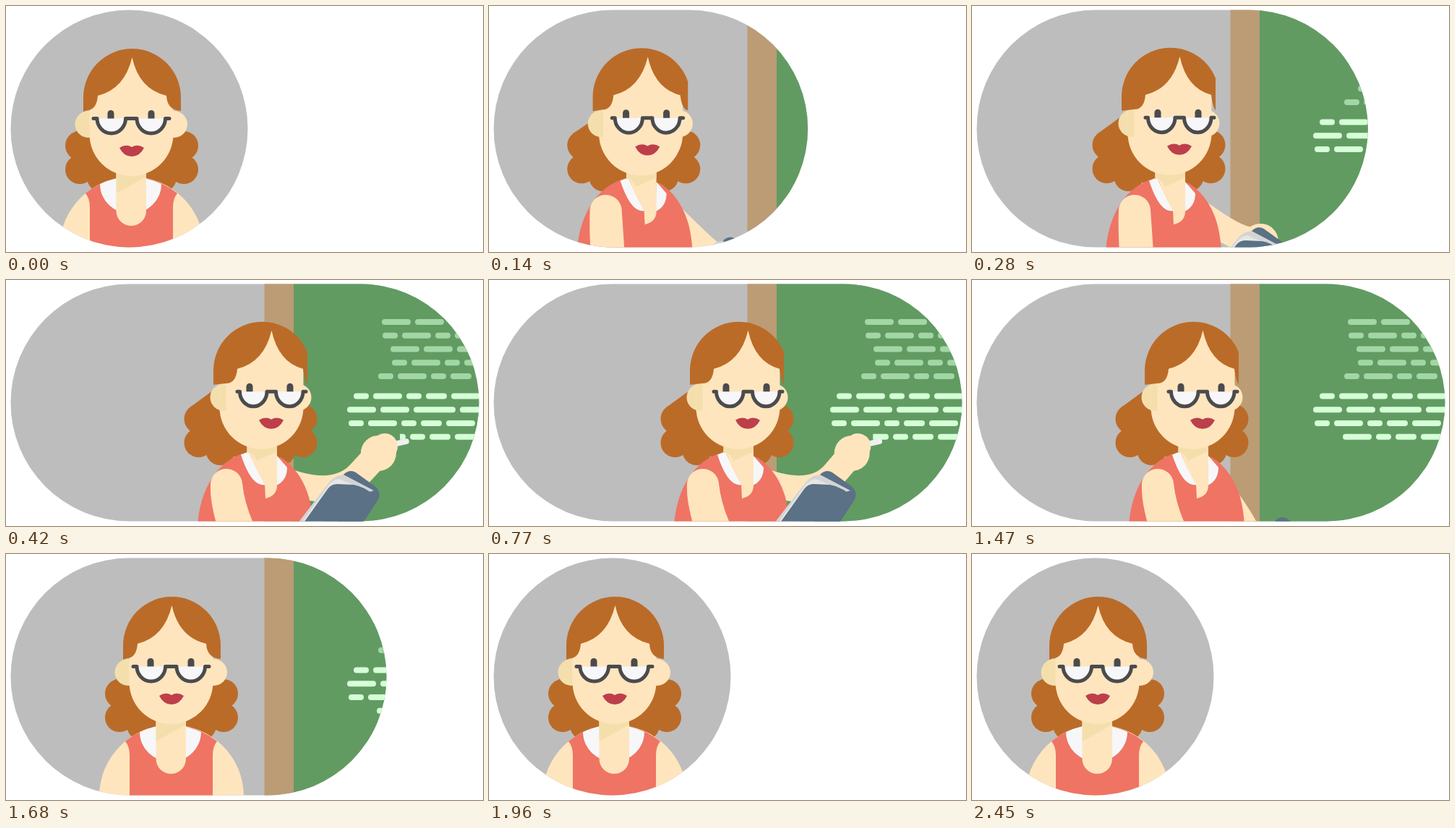
An HTML page for the animation above (2730 ms loop, 660 by 340 pixels).

```html
<!DOCTYPE html>
<html>
<head>
<meta charset="utf-8">
<title>Teacher at the board</title>
<style>
html, body { margin: 0; width: 100%; height: 100%; overflow: hidden; background: #fff; }
svg { display: block; }
</style>
</head>
<body>
<svg width="660" height="340" viewBox="0 0 660 340">
  <clipPath id="pill"><rect id="window" x="6.5" y="5.5" width="328" height="328" rx="164"/></clipPath>
  <clipPath id="written"><rect id="reveal" y="205" width="200" height="24"/></clipPath>
  <g clip-path="url(#pill)">
    <rect width="660" height="340" fill="#bdbdbd"/>
    <rect x="357.5" width="41" height="340" fill="#bc9c74"/>
    <rect x="398" width="262" height="340" fill="#619b62"/>
    <g id="rows" stroke-width="8" stroke-linecap="round"></g>
    <g id="her"></g>
  </g>
</svg>
<script>
const LOOP = 2730, STEP = 70;
const SKIN = '#fee5bd', SHADE = '#f4dfac', HAIR = '#bb6b28', DRESS = '#ef7464',
      WHITE = '#f7f7f9', DARK = '#4b4b4d', LIPS = '#bd3f4a', BOOK = '#5a7186';
const $ = id => document.getElementById(id);
const lerp = (a, b, k) => a + (b - a) * k;

// Piecewise linear track: time, value, time, value...
function track(t, ...k) {
  if (t <= k[0]) return k[1];
  for (let i = 2; i < k.length; i += 2)
    if (t <= k[i]) return lerp(k[i - 1], k[i + 1], (t - k[i - 2]) / (k[i] - k[i - 2]));
  return k[k.length - 1];
}

const path = (d, fill, more = '') => `<path d="${d}" fill="${fill}" ${more}/>`;
const disc = (x, y, r, fill) => `<circle cx="${x}" cy="${y}" r="${r}" fill="${fill}"/>`;
const pen = (color, w) =>
  `stroke="${color}" stroke-width="${w}" stroke-linecap="round" stroke-linejoin="round"`;
const stroke = (d, color, w) => path(d, 'none', pen(color, w));

// Chalk rows: left end and the kinds of dash that follow
function chalkRows() {
  const size = { s: 21, m: 29, l: 40, w: 58 };
  const rows = '520ll 521slsl 532llsl 534slsl 515slsm 481slsml 472llwl 474slsml 513lsml'.split(' ');
  return rows.map((row, i) => {
    const lower = i > 4, y = 57.9 + 18.8 * i + (lower ? 8.5 : 0);
    let x = parseInt(row), d = '';
    for (const kind of row.slice(3)) {
      d += `M${x + 4} ${y}h${size[kind] - 8}`;
      x += size[kind] + 6;
    }
    const clip = i === rows.length - 1 ? 'clip-path="url(#written)"' : '';
    return path(d, 'none', `stroke="${lower ? '#d5ffd6' : '#a3d6a5'}" ${clip}`);
  }).join('');
}

function backHair(u) {
  const lobes = [[72, 193], [72, 226], [42, 237]];
  return `<g transform="translate(${-15.5 * u} ${-u})">` +
    path(`M${112 + 9.5 * u} ${165 - 11 * u}L90 177V226L132 245H216L246 226V193L190 150Z`, HAIR) +
    lobes.map(([dx, y]) => disc(174 - dx, y, 20, HAIR) + disc(174 + dx, y, 20, HAIR)).join('') +
    '</g>';
}

function frontBody() {
  return `<ellipse cx="174" cy="335" rx="100" ry="99" fill="${SKIN}"/>` +
    path('M116 340V278Q116 266 110 259A100 99 0 0 1 237 259Q231 266 231 278V340Z', DRESS) +
    path('M130 246A42.5 41 0 0 0 215 246A100 99 0 0 0 130 246Z', WHITE) +
    path('M152.5 220V283A20.7 20.7 0 0 0 194 283V220Z', SKIN) +
    path('M152.5 225H194V236L152.5 259Z', SHADE);
}

// lift: 0 hanging, 1 reaching forward, 2 writing
function rightArm(lift, nudge) {
  const ex = 245 + 15 * lift, ey = 335 - 15 * lift;
  const hx = 262 + 39 * lift + nudge, hy = 370 - 18 * lift - 26 * lift * lift;
  const mx = (ex + hx) / 2, my = (ey + hy) / 2;
  const chalk = lift > 1.4 ? stroke(`M${hx + 8} ${hy - 2}l22 -5`, '#f0f0f0', 7.5) : '';
  return chalk + stroke(`M200 275Q${ex} ${ey} ${mx} ${my}L${hx} ${hy}`, SKIN, 36) +
    disc(lerp(hx, mx, 0.25), lerp(hy, my, 0.25), 24.5, SKIN);
}

function book(lift) {
  return `<g transform="translate(-171 ${64 - 12 * lift - 10 * lift * lift})">` +
    path('M440 290L459 268Q467 261 475 266L500 284Q511 292 506 303L478 346L420 420H380Z', BOOK) +
    path('M394 337L434 285Q441 275 449 271L458 269L500 291L470 300L400 420H340Z', '#d4d4d4') +
    path('M399 337L437 284Q443 276 452 275L490 291L450 292L390 420H350Z', '#e6e6e6') +
    path('M401 338L436 289Q441 282 449 282L472 283Q490 286 506 303L478 346L420 420H350Z', BOOK) +
    '</g>';
}

function turnedBody(t) {
  const lift = track(t, 0, 0, 280, 1, 420, 2, 1260, 2, 1470, 0);
  const bend = track(t, 280, 0, 420, 1);
  return rightArm(lift, track(t, 560, 4, 1050, -7)) +
    path('M85 340C88 290 112 250 150 239L200 245Q228 263 239 300Q244 318 245 340Z', DRESS) +
    path('M145 241.5L156 237Q168 265 179 283Q160 287 145 241.5Z', WHITE) +
    path('M195 243L209 259Q209 277 194 284Z', WHITE) +
    path('M153.5 222V238Q157 237 160 246Q168 267 178 282L179 302Q195 298 195 284V222Z', SKIN) +
    path('M153.5 225H195V237L167 250Q160 236 153.5 240Z', SHADE) +
    path(`M${104 + 8 * bend} 340Q102 305 103 285A22 22 0 0 1 147 281` +
      `Q${149 + bend} 310 ${151 + 13 * bend} 340Z`, SKIN) +
    book(lift);
}

function hairCap(u) {
  const r = 67.5, right = 242 - 5 * u;
  const rightY = 126.5 - Math.sqrt(Math.max(0, r * r - (right - 174.5) ** 2));
  const s = 13 * u;
  return path(`M107 146V126.5A${r} ${r} 0 0 1 ${right} ${rightY}V145` +
    `Q${223 + 11 * u} 144 ${222 + 9 * u} 124Q${184 + s} 115 ${174.5 + s} 71` +
    `Q${164 + s} 115 ${127 + s} 124C${126 + s} 138 ${120 + s} 144 ${113 + s} 144Z`, HAIR);
}

function glasses(u) {
  const lens = 39.5 - 2 * u, a = 126 + 17.5 * u, c = 181 + 12.5 * u;
  const rim = `a${lens / 2} 20.5 0 0 0 ${lens} 0`;
  return path(`M${121 + 19 * u} 155.5H${a}${rim}H${c}${rim}H${226 + 9 * u}`, WHITE, pen(DARK, 5));
}

function head(u, blink) {
  const eye = x => blink
    ? path(`M${x - 4.5} 153h9v3h-9Z`, DARK)
    : stroke(`M${x} 148.5V156`, DARK, 9);
  return `<g transform="translate(0 ${-1.3 * u})">` +
    disc(114 + 7 * u, 163.5, 18.5, SHADE) + disc(232.5 - 8.5 * u, 163.5, 18.5, SKIN) +
    `<rect x="115.5" y="66" width="116" height="169" rx="58" fill="${SKIN}"/>` +
    `<rect x="115.5" y="145" width="${9 * u}" height="37" fill="${SHADE}"/>` +
    hairCap(u) + eye(145 + 12 * u) + eye(201 + 12 * u) + glasses(u) +
    path('M157 196Q166 190 174 195Q182 190 191 196Q185 208 174 208Q163 208 157 196Z', LIPS,
      `transform="translate(${13 * u} ${-u})"`) + '</g>';
}

function draw(t) {
  const turn = track(t, 0, 0, 210, 1, 1540, 1, 1680, 0);
  const walk = t < 420
    ? 180 * (t / 420) ** 1.45
    : track(t, 560, 180, 1050, 159, 1260, 159, 1470, 132, 1680, 55, 1960, 0);
  const blink = t === 2170 || t === 2380;
  $('window').setAttribute('width', track(t, 0, 328, 420, 648, 1540, 648, 1890, 328));
  $('reveal').setAttribute('x', track(t, 560, 545, 1050, 513));
  $('her').setAttribute('transform', `translate(${walk})`);
  $('her').innerHTML = backHair(turn) + (turn > 0.5 ? turnedBody(t) : frontBody()) + head(turn, blink);
}

$('rows').innerHTML = chalkRows();
const start = performance.now();
let shown = -1;
function tick() {
  const t = Math.floor((performance.now() - start) % LOOP / STEP) * STEP;
  if (t !== shown) draw(shown = t);
  requestAnimationFrame(tick);
}
tick();
</script>
</body>
</html>
```
